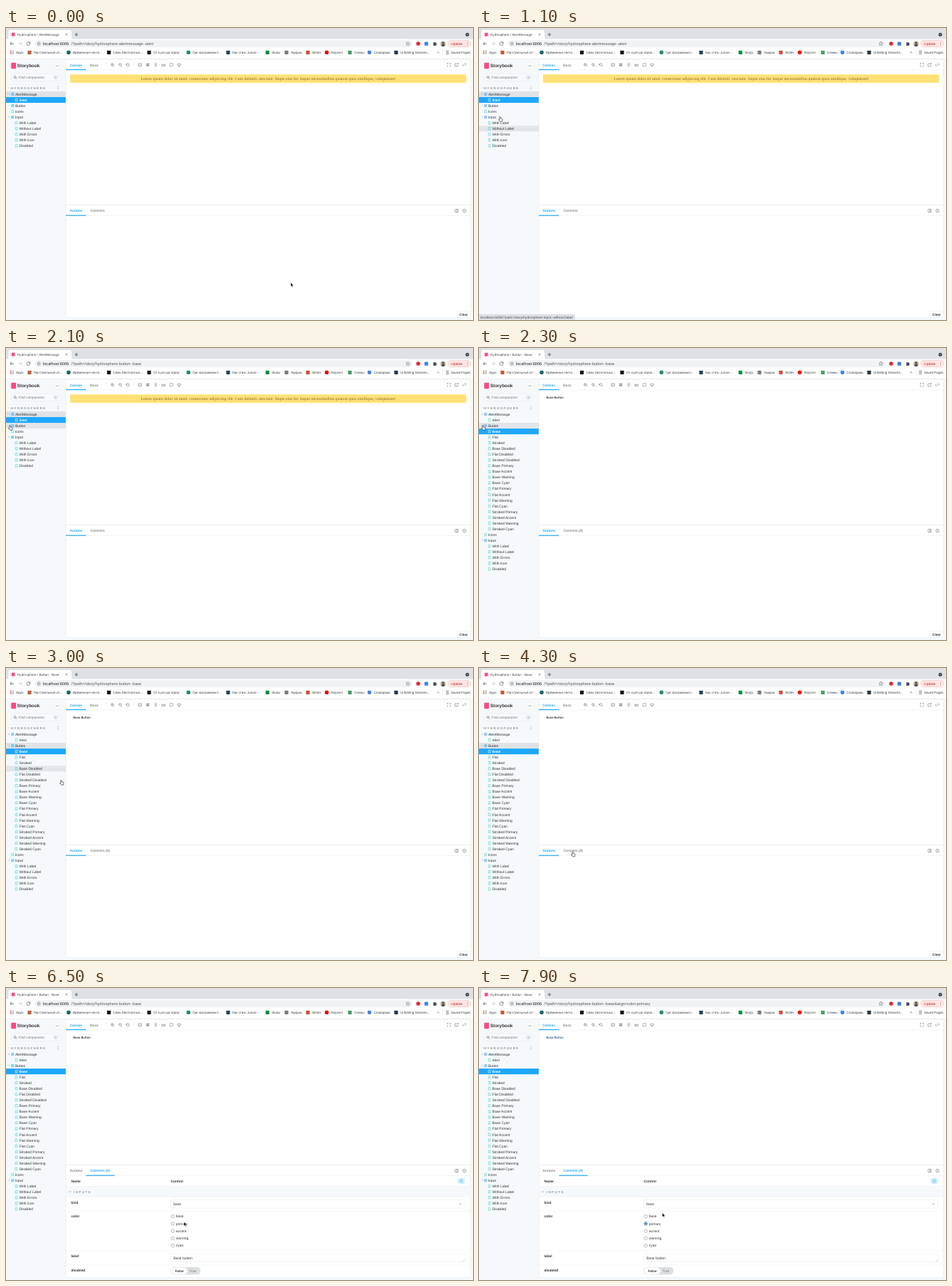
These frames come from a looping animation (656x410 px, 8 s). An HTML page:

```html
<!DOCTYPE html>
<html lang="en">
<head>
<meta charset="utf-8">
<title>Component explorer</title>
<style>
  html, body { margin: 0; width: 100%; height: 100%; overflow: hidden; background: #f6f9fc; }
  svg { display: block; width: 656px; height: 410px; }
  text { font-family: "Liberation Sans", Arial, sans-serif; text-rendering: geometricPrecision; white-space: pre; }
  .serif { font-family: "Liberation Serif", serif; }
  .button { font-family: Roboto, sans-serif; }
</style>
</head>
<body>
<svg id="stage" viewBox="0 0 656 410"></svg>
<script>
const LOOP = 8000, STEP = 100;
const BLUE = '#1ea7fd', TEAL = '#37d5d3', INK = '#333', GREY = '#888', LINE = '#e4e8eb';
const stage = document.getElementById('stage');
let layer = stage;

function add(tag, attrs = {}) {
  const node = document.createElementNS('http://www.w3.org/2000/svg', tag);
  for (const key in attrs) node.setAttribute(key, attrs[key]);
  return layer.appendChild(node);
}
function group(draw) {
  const outer = layer, g = add('g');
  layer = g;
  draw();
  layer = outer;
  return g;
}
const rect = (x, y, width, height, fill, more = {}) => add('rect', { x, y, width, height, fill, ...more });
const circle = (cx, cy, r, fill, more = {}) => add('circle', { cx, cy, r, fill, ...more });
const line = (d, stroke = '#777', width = .6, fill = 'none') => add('path', { d, stroke, fill, 'stroke-width': width });
// y is the middle of the line of text
function label(x, y, string, size = 5, fill = INK, more = {}) {
  const node = add('text', { x, y: y + size * .35, 'font-size': size, fill, ...more });
  node.textContent = string;
  return node;
}
const bold = (x, y, string, size = 4.9, fill = INK, more = {}) =>
  label(x, y, string, size, fill, { 'font-weight': 700, ...more });
const box = (x, y, w, h, r, fill = '#fff', stroke = '#e1e4e7') =>
  rect(x, y, w, h, fill, { rx: r, stroke, 'stroke-width': .5 });

/* ---------- browser ---------- */
rect(0, 0, 656, 18, '#dee1e6');
add('path', { d: 'M1 16Q3.500 16 3.500 13V6Q3.500 3 6.500 3H89Q92 3 92 6V13Q92 16 94.500 16Z', fill: '#fff' });
rect(0, 15.500, 656, 28, '#fff');
rect(8, 6.700, 4.600, 4.800, '#ff4785');
const tabTitle = label(16, 9.200, '', 4.650, '#45484c');
line('M83.500 7.600l3 3m0-3l-3 3', '#5f6368');
line('M96.400 9.200h5m-2.500-2.500v5', '#444', .7);
circle(648, 9.200, 2.500, '#3c4043');
line('M646.900 8.700l1.100 1.100 1.100-1.100', '#fff', .6);

line('M11 22H5.800m2.400-2.400L5.800 22l2.400 2.400', '#50545a', .75);
line('M17.300 22h5.200m-2.400-2.400l2.400 2.400-2.400 2.400', '#b9bcc0', .75);
line('M33.600 20.600a2.400 2.400 0 1 0 .4 1.800M34 19.300v1.900h-1.900', '#50545a', .75);
rect(40, 17, 531, 10, '#f1f3f4', { rx: 5 });
circle(46.200, 22, 2, 'none', { stroke: '#5f6368', 'stroke-width': .6 });
line('M46.200 21.700v1.400m0-2.300v.5', '#5f6368', .5);
label(52, 22, 'localhost:6006', 5.620, '#202124');
const pathText = label(91.500, 22, '', 5.620, '#53575c');
add('path', { d: 'M564.500 19.200l.8 1.800 2 .2-1.500 1.300.5 2-1.800-1.100-1.800 1.100.5-2-1.500-1.300 2-.2Z',
  fill: 'none', stroke: '#50545a', 'stroke-width': .5 });
circle(579, 22, 2.800, '#dc2b2b');
rect(587.800, 19.500, 5.200, 5.200, '#3f83dc', { rx: .8 });
add('path', { d: 'M600 20.500h1.300a.9.9 0 0 1 1.700 0h1.300v1.300a.9.900 0 0 1 0 1.700v1.300H600v-1.400a.8.800 0 0 0 0-1.600Z', fill: '#44484d' });
circle(614, 22, 3.800, '#c9b7a4');
add('path', { d: 'M611.200 24.600q2.800-4 5.600 0a3.800 3.800 0 0 1-5.600 0Z', fill: '#4b4040' });
circle(614, 21, 1.500, '#4b4040');
box(620.500, 17.300, 32.500, 9.400, 4.700, '#fce8e6', '#eeb1ac');
label(625, 22, 'Update', 5.100, '#c5221f');
for (const y of [20.300, 22, 23.700]) circle(648.500, y, .45, '#c5221f');

for (let i = 0; i < 9; i++)
  rect(5.700 + i % 3 * 1.900, 31.700 + Math.floor(i / 3) * 1.900, 1.300, 1.300, ['#e0584c', '#e8a33a', '#5498e6'][i % 3]);
label(14, 34.300, 'Apps', 4.600, '#3c4043');
[
  [33, '#c65b39', 'Расстрельный сп...', 1], [88, '#17676b', 'Временная почта...'],
  [144.500, '#151515', 'Семь бесплатных...', 1], [201, '#111', 'От нуля до героя...', 1],
  [256.300, '#208d6d', 'Где программист...'], [312, '#1c4563', 'Как стать Junior-...', 1],
  [367.300, '#188b38', 'Study', 1], [394, '#777b80', 'Лумрик', 1], [424, '#d94b3e', 'Wolmi', 1],
  [450.600, '#f00000', 'Klipzorn'], [483, '#42a05c', 'Схемы', 1], [510.500, '#4285f4', 'Словарики'],
  [548, '#24364b', 'Unfolding Streams...', 1]
].forEach(([x, color, name, square]) => {
  if (square) rect(x - 2.600, 31.700, 5.200, 5.200, color, { rx: .6 });
  else circle(x, 34.300, 2.800, color);
  label(x + 5.900, 34.300, name, 4.600, '#3c4043');
});
line('M605.700 33l1.200 1.200-1.200 1.200m1.600-2.400l1.200 1.200-1.200 1.200', '#444', .5);
line('M613.500 30v8.500', '#d5d8dc', .5);
line('M618 32.300h4.200m-4.200 2h4.200m-4.200 2h4.200', '#50545a', .7);
label(625, 34.300, 'Saved Pages', 4.600, '#3c4043');
rect(0, 43, 656, 367, '#f6f9fc');
line('M0 43.200H656', '#dfe2e5', .5);

/* ---------- sidebar ---------- */
const ROW = 8.055, rowY = i => 93 + i * ROW;
rect(7.300, 48.800, 6.800, 8.400, '#ff4785', { rx: .6 });
bold(15.800, 53, 'Storybook', 6.400, '#333');
circle(71.700, 53, 5.100, '#fff', { stroke: '#dde2e6', 'stroke-width': .5 });
for (const x of [70, 71.700, 73.400]) circle(x, 53, .6, '#666');
box(7, 64, 70, 10.700, 5.300, '#f7fafd', '#dde3e8');
circle(12.600, 69, 1.500, 'none', { stroke: '#555', 'stroke-width': .6 });
line('M13.700 70.100l1.400 1.400', '#555', .7);
label(17.500, 69.300, 'Find components', 4.760, '#737578');
box(67, 66.700, 5.600, 5.300, 1.300, '#e7eaed', '#dde1e5');
label(69.100, 69.300, '/', 4, '#777');
const heading = (x, y, string) => bold(x, y, string, 4.300, '#8b9096', { 'letter-spacing': 1.5 });
heading(7, 84, 'HYDROSPHERE');
line('M3.200 83.500l1 1 1-1', '#a3a8ad', .5);
line('M71.800 83.100l1.200-1.200 1.200 1.200m-2.400 1.700l1.200 1.200 1.200-1.200', '#8b9096', .55);

const parentBar = rect(0, 0, 84, ROW, '#dfe3e6');
const hoverBar = rect(0, 0, 84, ROW, '#e2e5e9');

function bookmarkIcon(x, y, color) {
  line(`M${x - 1.300} ${y - 1.900}h2.600v3.900l-1.300-.9-1.300.9Z`, color, .6);
}
// Names starting with "-" are stories; "+" marks an expandable component.
function tree(names, selected) {
  return group(() => names.forEach((entry, i) => {
    const y = rowY(i), story = entry[0] === '-', component = entry[0] === '+';
    const name = entry.replace(/^[-+]/, '');
    const active = i === selected;
    if (active) rect(0, y - ROW / 2, 84, ROW, BLUE);
    if (story) bookmarkIcon(14.500, y, active ? '#fff' : TEAL);
    else if (component) {
      line(`M3.500 ${y - .5}h1.600l-.8 1Z`, '#a9b0b6', .3, '#a9b0b6');
      for (const dx of [0, 2]) for (const dy of [0, 2])
        box(7.600 + dx, y - 1.700 + dy, 1.400, 1.400, .2, 'none', BLUE);
    } else bookmarkIcon(9.200, y, TEAL);
    const x = story ? 18.600 : 12.900;
    active ? bold(x, y, name, 4.900, '#fff') : label(x, y, name, 5, '#333');
  }));
}
const inputs = ['Icons', '+Input', '-With Label', '-Without Label', '-With Errors', '-With Icon', '-Disabled'];
const variants = kind => ['Primary', 'Accent', 'Warning', 'Cyan'].map(tone => `-${kind} ${tone}`);
const alertTree = tree(['+AlertMessage', '-Alert', '+Button', ...inputs], 1);
const buttonTree = tree(['+AlertMessage', '-Alert', '+Button', '-Base', '-Flat', '-Stroked',
  '-Base Disabled', '-Flat Disabled', '-Stroked Disabled',
  ...variants('Base'), ...variants('Flat'), ...variants('Stroked'), ...inputs], 3);

/* ---------- canvas ---------- */
box(84.200, 44, 568, 362.500, 2, '#fff', '#dfe4e8');
line('M84.200 59H652', LINE, .5);
bold(89.500, 51.800, 'Canvas', 4.900, BLUE);
bold(117.800, 51.800, 'Docs', 4.950, GREY);
rect(84.200, 57.900, 28, 1.200, BLUE);
line('M140 47.800v8M179.800 47.800v8', LINE, .5);
for (const [x, mark] of [[149.300, 'h1.800m-.9-.9v1.800'], [160.300, 'h1.800']]) {
  circle(x, 51.400, 1.800, 'none', { stroke: '#777', 'stroke-width': .6 });
  line(`M${x + 1.300} 52.700l1.500 1.500`);
  line(`M${x - .9} 51.400${mark}`, '#777', .5);
}
circle(171, 51.400, 1.800, 'none', { stroke: '#777', 'stroke-width': .6 });
line('M172.300 52.700l1.500 1.500M168.700 50.300l.3 1.500 1.300-.6');
box(185.900, 49.600, 4.400, 4.200, .4, 'none', '#666');
line('M186 52.600l1.500-1.300 1 1 1-.8.800.8', '#666', .5);
for (let i = 0; i < 4; i++) rect(197.200 + i % 2 * 2.200, 49.700 + (i >> 1) * 2.200, 1.800, 1.800, '#888');
line('M208.200 49.900h4.200m-4.200 1.800h4.200m-4.200 1.800h4.200M210.300 49.500v4.400', '#888', .5);
line('M219 50v3.600h4.400V50m-4.400 1.800h4.400m-3-1v1m1.500-1v1', '#777', .55);
line('M230.200 49.600h4.200v4.200h-4.200Z', '#777', .55);
line('M240.900 50.200h4.500v2.300h-4.500Zm2.200 2.300v1.600m-1 0h2', '#777', .55);
line('M619.900 51v-1.400h1.400m1.600 0h1.400V51m0 1.500v1.400h-1.400m-1.600 0h-1.400v-1.400', '#777', .65);
line('M633 49.900h-2.200v4h4.200v-2m-2-.2l2.200-2.200m-1.500 0h1.500V51', '#777', .6);
line('M643.700 51.100l1-1a1.100 1.100 0 0 1 1.500 1.500l-1 1m-1 -.4l-1 1a1.100 1.100 0 0 1-1.500-1.500l1-1', '#777', .6);

const alertView = group(() => {
  rect(90, 65.200, 556.500, 11.800, '#ffe178');
  label(368.300, 71, 'Lorem ipsum dolor sit amet, consectetur adipiscing elit. Cum deleniti, nesciunt. Atque eius hic itaque necessitatibus quaerat quos similique, voluptatum!',
    5.880, '#85651f', { class: 'serif', 'text-anchor': 'middle' });
});
const baseButton = label(94.500, 69.500, 'Base Button', 4.450, INK, { class: 'button', 'font-weight': 500 });

/* ---------- addons panel ---------- */
line('M84.200 248.600H652', '#dfe3e7', .6);
line('M84.200 263.700H652', LINE, .5);
const actionsTab = bold(89.500, 256.500, 'Actions');
const controlsTab = bold(118.500, 256.500, 'Controls');
const underline = rect(84.200, 262.600, 28, 1.200, BLUE);
line('M630.900 254.500h4.200v4h-4.200Zm2.600 0v4', '#777', .6);
circle(644, 256.500, 2.300, 'none', { stroke: '#777', 'stroke-width': .6 });
line('M643.200 255.700l1.600 1.600m0-1.600l-1.600 1.600', '#777', .5);

const actionsView = group(() => {
  line('M633.500 406v-8.500H652', LINE, .5);
  bold(637, 402, 'Clear', 4.700, INK);
});

const radioDots = [];
const controlsView = group(() => {
  bold(91.500, 271, 'Name');
  bold(231.500, 271, 'Control');
  rect(634, 266.500, 11, 9, '#d6effd', { rx: 4.500 });
  circle(639.500, 271, 1.900, 'none', { stroke: BLUE, 'stroke-width': .6 });
  rect(84.500, 278.500, 567.300, 14.700, '#f6f9fc');
  line('M88.500 285.300l1.300 1.300 1.300-1.300', '#777', .6);
  heading(95, 286, 'INPUTS');
  for (const y of [278.500, 293.200, 313, 369, 389]) line(`M84.500 ${y}H651.700`, LINE, .5);
  [['kind', 301], ['color', 320.600], ['label', 376.600], ['disabled', 396.500]]
    .forEach(([name, y]) => bold(91.500, y, name));
  box(231.300, 297.500, 413.500, 11.500, 1.500);
  label(235.200, 303.300, 'base');
  line('M636.900 302.500l1.500 1.500 1.500-1.500', '#555', .6);
  ['base', 'primary', 'accent', 'warning', 'cyan'].forEach((name, i) => {
    const y = 320.600 + i * 10.270;
    circle(234.300, y, 2.200, '#fff', { stroke: '#767676', 'stroke-width': .5 });
    label(238.700, y, name);
    if (name === 'primary') radioDots.push(
      circle(234.300, y, 2.200, '#fff', { stroke: '#1a73e8', 'stroke-width': .6 }),
      circle(234.300, y, 1.350, '#1a73e8'));
  });
  box(231.300, 373, 413.500, 11.500, 1.500);
  label(235.200, 379, 'Base button');
  line('M641.800 383.500l2-2m-.8 2l.8-.8', '#777', .4);
  rect(231.300, 391.700, 42, 10.900, '#dcdfe2', { rx: 5.450 });
  rect(232, 392.400, 22.800, 9.500, '#fff', { rx: 4.750 });
  bold(237.500, 397.200, 'False', 4.700);
  label(257.500, 397.200, 'True', 4.800, '#777');
});

/* ---------- status bar and pointer ---------- */
const status = group(() => {
  rect(-2, 402.200, 136.500, 10, '#dee1e6', { rx: 1.500, stroke: '#c6c9cd', 'stroke-width': .4 });
  label(1.800, 406.300, 'localhost:6006/?path=/story/hydrosphere-input--without-label', 4.830, '#4a4d51');
});
const arrow = add('path', { d: 'M0 0V5.600L1.300 4.400 2.200 6.400 3.100 6 2.200 4.100H3.900Z', fill: '#000', stroke: '#fff', 'stroke-width': .4 });
const hand = add('path', { d: 'M-.7.700a.7.700 0 0 1 1.400 0V2.500L3 3q.7.200.5 1.200L3 6.700H0L-2 4.300q.2-.9 1.300 0Z',
  fill: '#fff', stroke: '#111', 'stroke-width': .6 });

/* ---------- time tables ---------- */
const pointer = [
  [0, 400, 357.500], [100, 391.500, 357.500], [200, 391.500, 357.500], [300, 290, 302], [400, 206.500, 252.500],
  [500, 206.500, 252.500], [700, 160, 216], [900, 76, 155], [1100, 29.500, 124.500], [1400, 11, 108],
  [1800, 5.500, 108.500], [2600, 5.500, 108.500], [2800, 31, 125], [3000, 77.500, 157.500], [3200, 92, 182],
  [3500, 97.500, 203.500], [3600, 97.500, 203.500], [4000, 117, 235], [4300, 131.500, 258], [4900, 131.500, 258],
  [5200, 225.500, 300.300], [5400, 242, 314.500], [5500, 242, 314.500], [5700, 238, 319.500], [5800, 239, 320.500],
  [5900, 239, 320.500], [6500, 250, 328.500], [7200, 250, 328.500], [7500, 241, 341], [7900, 257.500, 315.800]
];
const hands = [[0, false], [900, true], [3100, false], [4200, true], [5000, false]];
const hovers = [[0, -1], [900, 8], [1000, 7], [1100, 6], [1200, 4], [1300, 2], [2800, 4], [2900, 5], [3000, 6], [3100, 8], [3200, -1]];
const parents = [[0, 0], [2200, 2], [4600, -1]];
const base = '/?path=/story/hydrosphere-';
const paths = [[0, base + 'alertmessage--alert'], [2000, base + 'button--base'], [6700, base + 'button--base&args=color:primary']];

const at = (table, t) => table.filter(row => row[0] <= t).pop()[1];
function position(t) {
  const next = pointer.findIndex(p => p[0] > t);
  if (next < 0) return pointer[pointer.length - 1].slice(1);
  const a = pointer[next - 1], b = pointer[next], k = (t - a[0]) / (b[0] - a[0]);
  return [1, 2].map(i => a[i] + (b[i] - a[i]) * k);
}
const show = (node, on) => node.setAttribute('display', on ? 'inline' : 'none');
function bar(node, row) {
  show(node, row >= 0);
  node.setAttribute('y', rowY(row) - ROW / 2);
}

function render(t) {
  const button = t >= 2200, controls = t >= 4600, primary = t >= 6700;
  tabTitle.textContent = 'Hydrosphere / ' + (button ? 'Button - Base' : 'AlertMessage');
  pathText.textContent = at(paths, t);
  show(alertTree, !button);
  show(buttonTree, button);
  show(alertView, !button);
  show(baseButton, button);
  baseButton.setAttribute('fill', primary ? '#245cad' : INK);
  bar(parentBar, at(parents, t));
  bar(hoverBar, at(hovers, t));
  show(status, t >= 900 && t < 1600);

  controlsTab.textContent = button ? 'Controls (4)' : 'Controls';
  actionsTab.setAttribute('fill', controls ? GREY : BLUE);
  controlsTab.setAttribute('fill', controls ? BLUE : GREY);
  underline.setAttribute('x', controls ? 112.500 : 84.200);
  underline.setAttribute('width', controls ? 40 : 28);
  show(actionsView, !controls);
  show(controlsView, controls);
  radioDots.forEach(dot => show(dot, primary));

  const isHand = at(hands, t), [x, y] = position(t);
  show(arrow, !isHand);
  show(hand, isHand);
  (isHand ? hand : arrow).setAttribute('transform', `translate(${x} ${y})`);
}

const start = performance.now();
function tick() {
  const t = (performance.now() - start) % LOOP;
  render(Math.floor(t / STEP) * STEP);
  requestAnimationFrame(tick);
}
tick();
</script>
</body>
</html>
```
